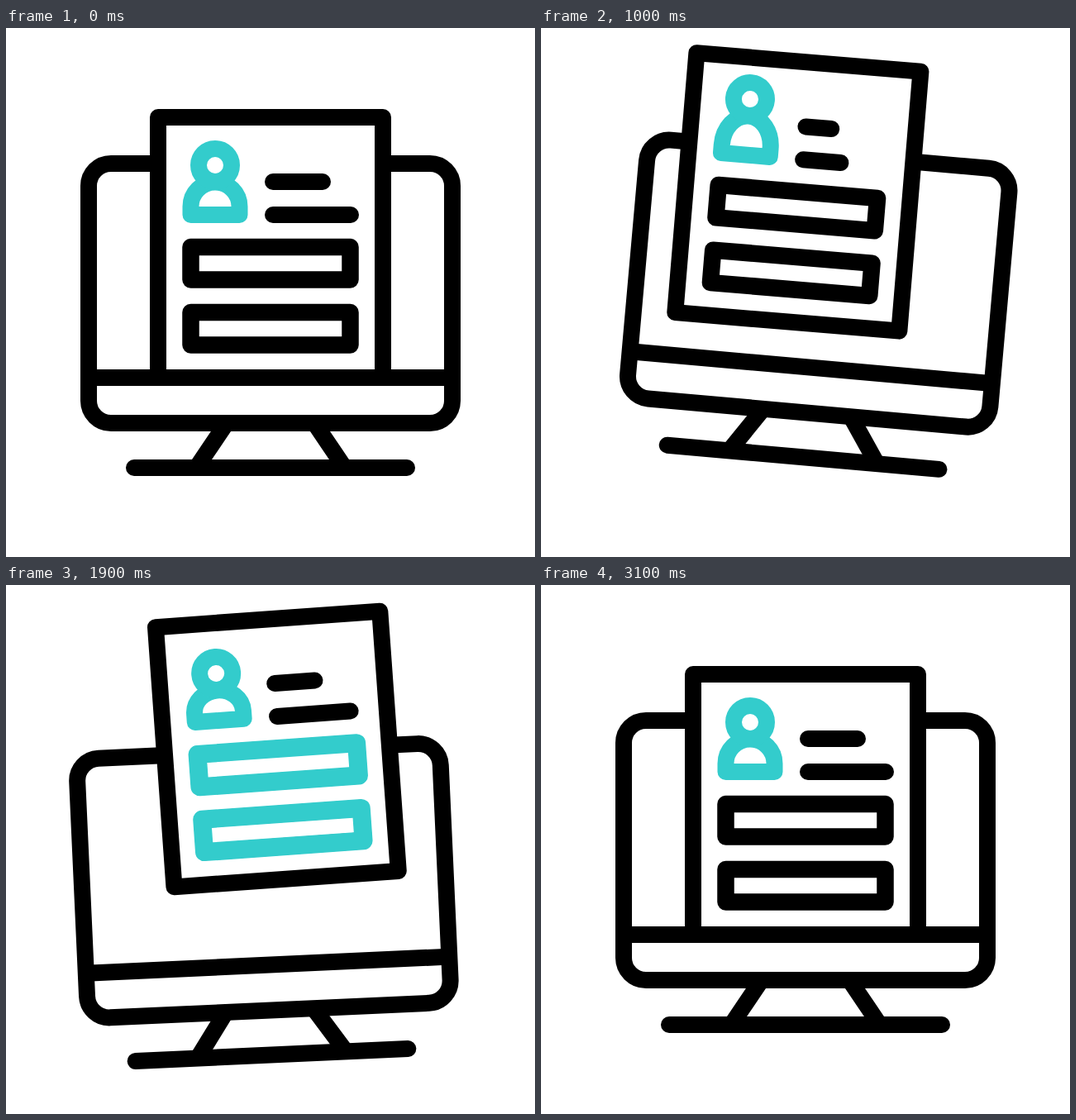
An HTML page for the animation above (3.6 s loop, 640 px wide and 640 px high).

```html
<!DOCTYPE html>
<html lang="en">
<head>
<meta charset="utf-8">
<title>Online form</title>
<style>
  html, body { margin: 0; width: 100%; height: 100%; overflow: hidden; background: #fff; }
  svg { display: block; width: 100vw; height: 100vh; }
  path, rect, circle { fill: none; stroke: #000; stroke-width: 20; stroke-linejoin: round; }
  .cap { stroke-linecap: round; }
  .teal { stroke: #3cc; }
  .field { stroke-width: 20.5; }
  .mark { stroke: #3cc; stroke-width: 22; stroke-linecap: round; }
</style>
</head>
<body>
<svg viewBox="0 0 640 640">
  <g id="monitor">
    <rect x="100" y="164" width="440" height="314" rx="27"/>
    <path d="M100 423H540M266.8 478L231.6 530M373.2 478L408.4 530"/>
    <path class="cap" d="M155 532H485"/>
  </g>
  <g id="paper">
    <rect x="184" y="108" width="272" height="315" style="fill:#fff"/>
    <path id="body" class="teal"/>
    <circle id="head" class="teal" cx="253" r="20"/>
    <path id="line1" class="cap"/>
    <path id="line2" class="cap"/>
    <path class="field" d="M223.5 265H416.5V304.5H223.5Z"/>
    <path class="field" d="M223.5 344H416.5V383.5H223.5Z"/>
    <path id="mark1" class="mark" pathLength="100" d="M223.5 265H416.5V304.5H223.5Z"/>
    <path id="mark2" class="mark" pathLength="100" d="M223.5 344H416.5V383.5H223.5Z"/>
  </g>
</svg>
<script>
const LOOP = 3600;
let t = 0;

const set = (id, name, value) => document.getElementById(id).setAttribute(name, value);

// Eased step from 0 to 1 between two times.
function ease(from, to) {
  const p = Math.min(1, Math.max(0, (t - from) / (to - from)));
  return (1 - Math.cos(Math.PI * p)) / 2;
}

// 0 to 1, a hold, and back to 0.
const pulse = (a, b, c, d) => ease(a, b) - ease(c, d);

// 0 to 1 and straight back.
const bump = (a, peak, b) => pulse(a, peak, peak, b);

function pose(id, y, angle, pivotY) {
  set(id, "transform", `translate(0 ${y}) rotate(${angle} 320 ${pivotY})`);
}

function line(id, y, length) {
  set(id, "d", `M323 ${y}h${length}`);
}

function trim(id, part) {
  set(id, "visibility", part > 0.001 ? "visible" : "hidden");
  set(id, "stroke-dasharray", part > 0.999 ? "none" : `${100 * part} 200`);
}

function draw() {
  const bob = bump(630, 1500, 2520) - bump(270, 630, 1500);
  const tilt = bump(520, 980, 1620) - bump(980, 1620, 2190);
  pose("monitor", 55 * bob, 5.1 * tilt, 499);

  const lift = pulse(260, 920, 2370, 3090);
  const sway = bump(360, 1110, 1780) - bump(1110, 1780, 2400) + bump(1780, 2400, 3090);
  pose("paper", -66.7 * lift, 5 * sway, 155);

  const stretch = 8 * bump(480, 940, 1420) - 4 * bump(1420, 1700, 2280);
  set("head", "cy", 166 - stretch);
  set("body", "d", `M223.5 226V216A29.5 ${29.5 + stretch} 0 0 1 282.5 216V226Z`);

  line("line1", 186, 60 - 34 * pulse(340, 900, 2280, 2960) + 55 * bump(900, 1420, 2280));
  line("line2", 226, 94 - 50 * (bump(460, 920, 1660) + bump(1780, 2360, 2960)));

  trim("mark1", pulse(1000, 1400, 2400, 2960));
  trim("mark2", pulse(1420, 1860, 2320, 2880));
}

const start = performance.now();
function tick() {
  t = (performance.now() - start) % LOOP;
  draw();
  requestAnimationFrame(tick);
}
tick();
</script>
</body>
</html>
```
